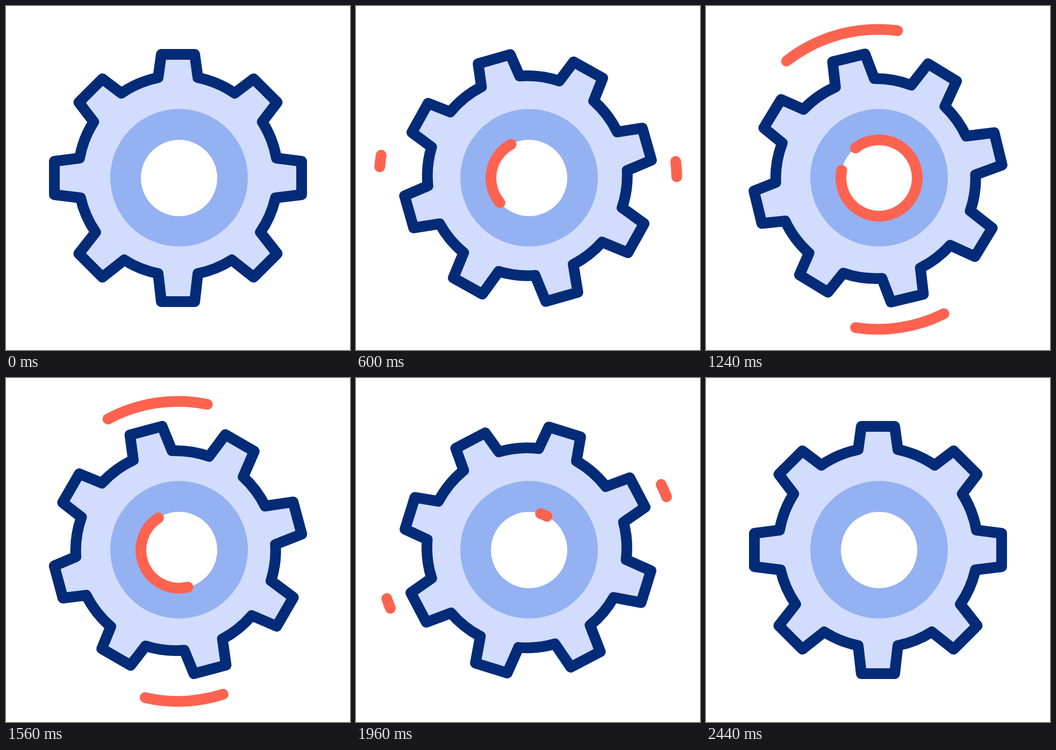
An HTML page for the animation above (2.48 s loop, 640 by 640 pixels).

```html
<!DOCTYPE html>
<html lang="en">
<head>
<meta charset="utf-8">
<title>Gear</title>
<style>
  html, body { margin: 0; width: 100%; height: 100%; overflow: hidden; background: #fff; }
  svg { display: block; width: 100%; height: 100%; }
  path { stroke-width: 20; stroke-linecap: round; stroke-linejoin: round; }
  .trail { fill: none; stroke: #fe6350; }
</style>
</head>
<body>
<svg viewBox="0 0 640 640">
  <path id="gear" fill="#d2dcfd" stroke="#032b78"/>
  <circle cx="322" cy="319.5" r="128" fill="#94b1f2"/>
  <circle cx="322" cy="320" r="71" fill="#fff"/>
  <path id="ring" class="trail"/>
  <path id="upper" class="trail"/>
  <path id="lower" class="trail"/>
</svg>
<script>
const LOOP = 2480;
const RAD = Math.PI / 180;
const el = id => document.getElementById(id);
const [gear, ring, upper, lower] = ['gear', 'ring', 'upper', 'lower'].map(el);

// Smooth curve through [time, value] keys without overshoot, at rest at both ends.
function track(...keys) {
  const n = keys.length;
  const rate = i => (keys[i + 1][1] - keys[i][1]) / (keys[i + 1][0] - keys[i][0]);
  const slope = keys.map((k, i) => {
    if (i === 0 || i === n - 1) return 0;
    const a = rate(i - 1), b = rate(i);
    return a * b > 0 ? 2 * a * b / (a + b) : 0;
  });
  return t => {
    if (t <= keys[0][0]) return keys[0][1];
    if (t >= keys[n - 1][0]) return keys[n - 1][1];
    let i = 0;
    while (t > keys[i + 1][0]) i++;
    const [t0, v0] = keys[i], [t1, v1] = keys[i + 1];
    const h = t1 - t0, u = (t - t0) / h, w = 1 - u;
    return v0 * w * w * (1 + 2 * u) + v1 * u * u * (1 + 2 * w)
      + h * u * w * (slope[i] * w - slope[i + 1] * u);
  };
}

const turn = track([0, 0], [200, -1], [400, -4.5], [600, -15.8], [920, -57.4], [1240, -103.55],
  [1400, -118], [1600, -100], [1800, -56.9], [2120, -7.87], [2240, -2.7], [2440, 0]);

// Angles run clockwise from the top.
const ringFrom = track([360, 226], [600, 229.6], [920, 257.7], [1240, 321.3], [1800, 678.4], [2120, 765.5]);
const ringTo = track([360, 226], [600, 331.3], [920, 565.8], [1240, 641.5], [1800, 718.4], [2120, 766]);
const head = track([440, 98], [600, 83.3], [920, -11.6], [1240, -37.9], [1360, -41], [1800, 7], [2050, 82]);
const tail = track([440, 98], [600, 89.1], [920, 25.4], [1240, 7.6], [1360, 5], [1800, 29.8], [2050, 82]);
const gap = track([1340, 191.6], [1800, 187.8], [2050, 183]);

function gearPath() {
  const R = 186, lift = 4.5, half = 37;
  let d = '';
  for (let k = 0; k < 8; k++) {
    const a = k * 45 * RAD, c = Math.cos(a), s = Math.sin(a);
    const put = (x, y) => `${(x * c - y * s).toFixed(2)} ${(x * s + y * c).toFixed(2)}`;
    // The body circle sits slightly off the axle.
    const cx = -lift * s, cy = -lift * c;
    const foot = x => put(x, cy - Math.sqrt(R * R - (x - cx) ** 2));
    d += (k ? `A${R} ${R} 0 0 1 ` : 'M') + foot(-half)
      + 'L' + put(-31, -230) + 'L' + put(31, -230) + 'L' + foot(half);
    if (k === 7) d += `A${R} ${R} 0 0 1 ` + d.slice(1, d.indexOf('L')) + 'Z';
  }
  return d;
}

function arc(node, shown, cx, cy, rx, ry, from, to) {
  node.style.display = shown ? '' : 'none';
  if (!shown) return;
  const span = Math.max(0.3, Math.min(359.9, to - from));
  const at = deg => `${(cx + rx * Math.sin(deg * RAD)).toFixed(2)} ${(cy - ry * Math.cos(deg * RAD)).toFixed(2)}`;
  node.setAttribute('d', `M${at(from)}A${rx} ${ry} 0 ${span > 180 ? 1 : 0} 1 ${at(from + span)}`);
}

function draw(t) {
  gear.setAttribute('transform', `translate(320 320) rotate(${turn(t).toFixed(3)})`);
  arc(ring, t > 360 && t < 2140, 322, 320, 71, 71, ringFrom(t), ringTo(t));
  const visible = t > 440 && t < 2050;
  const h = head(t), len = tail(t) - h, low = h + gap(t);
  arc(upper, visible, 320, 322.5, 276.8, 279, h, h + len);
  arc(lower, visible, 320, 322.5, 276.8, 279, low, low + len * 0.77);
}

gear.setAttribute('d', gearPath());
const begin = performance.now();
function tick() {
  draw((performance.now() - begin) % LOOP);
  requestAnimationFrame(tick);
}
tick();
</script>
</body>
</html>
```
